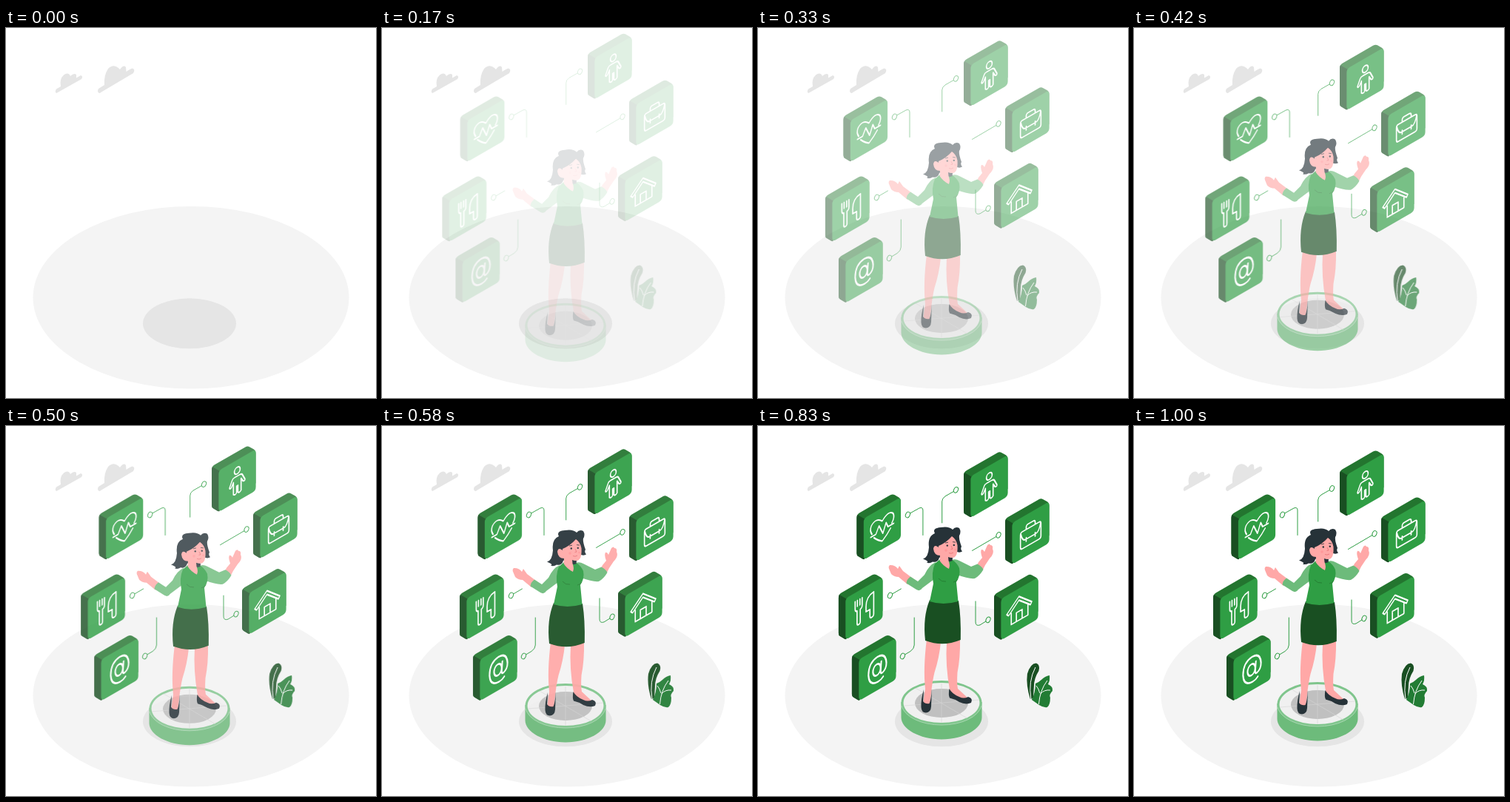
Animation of 500x500 px, one loop 1040 ms. Source, as an HTML page:

```html
<!DOCTYPE html>
<html lang="en">
<head>
<meta charset="utf-8">
<title>Services around a woman</title>
<style>
html, body { margin: 0; width: 100%; height: 100%; overflow: hidden; background: #fff; }
svg { display: block; width: 100vw; height: 100vh; }
.icon, .wire { fill: none; stroke-linecap: round; stroke-linejoin: round; }
.icon { stroke: #fff; }
.wire { stroke: #2f9e44; stroke-width: 1; }
.skin { fill: #ffa8a7; }
.dark { fill: #263238; }
.green { fill: #2f9e44; }
.soft { fill: #6dbb7b; }
.deep { fill: #194f22; }
</style>
</head>
<body>
<svg viewBox="0 0 500 500">
  <ellipse cx="250" cy="364.2" rx="213.5" ry="123.3" fill="#f4f4f4"/>
  <ellipse cx="248" cy="399.3" rx="63" ry="34" fill="#e5e5e5"/>
  <g fill="#e5e5e5">
    <path d="M126 88Q122.500 86 125 82L133 77Q132 64 138 55Q145 48 152 54L154 56Q159 49 162 53L162.500 59Q168 55 171 54.500Q175 56 172 61L129 86.500Q127 88 126 88Z"/>
    <path d="M68 88Q65.500 86 68 82.500L74 79Q72 69 78 63.500Q84 59 87 65Q92 60 95 63L95 67.500L101 64Q104.500 65 102 69L70 87Z"/>
  </g>

  <g id="left">
    <path class="deep" d="M366 369Q360 350 362 335Q366 321 374 320.500Q380 323 377.500 331Q371 341 371 352L370 368Z"/>
    <path fill="#227c34" d="M368 370Q373 360 373 348Q378 346 381 343Q386 338 392 337Q393 344 390 349Q397 352 396 358Q391 363 393 367Q393 377 389 380Q384 381 378 377Z"/>
    <path fill="none" stroke="#fff" d="M367 369Q363 345 373 326M377.500 376Q379 357 389 344M379.500 362Q385 356 393 357M379 361Q377 354 374 351"/>
  </g>
  <g id="right"></g>

  <g id="stand">
    <path class="soft" d="M193.500 375V396C193.500 411 218 425.500 248 425.500S302.500 411 302.500 396V375Z"/>
    <ellipse cx="248" cy="376" rx="54.500" ry="30" fill="#7fc58c"/>
    <path d="M194 380A54.500 30 0 0 0 302 380" fill="none" stroke="#a6d7af"/>
    <ellipse cx="248" cy="376" rx="51.500" ry="27" fill="#f0f0f0"/>
    <ellipse cx="248" cy="376.500" rx="36" ry="19.500" fill="#c0c0c0"/>
    <path d="M248 349.500V403M197 380L299 372M213 356L283 397" stroke="#d6d6d6" stroke-width=".6"/>
  </g>

  <g id="woman">
    <g class="skin">
      <path d="M228 290L247 294Q245 315 238.500 335Q236 345 234 362L232 379H223L226 357Q223 330 228 290Z"/>
      <path d="M255 294L273 290Q273.500 315 269.500 335Q268.500 350 270 357L283 369L276 376L259 368V358Q253 325 255 294Z"/>
      <path d="M209 208L204 204L196 198L191 191L189 195Q185 189.500 178 190Q175.500 192 177.500 196L180 202Q184 206 190 206L202 216Z"/>
      <path d="M295 192L298 186L303 180Q300 172 302 169Q304 168 306 172L310 163Q313 160 314 163Q318 163 317 168Q320 174 313 181L307 190L303 198Z"/>
    </g>
    <g class="dark">
      <path d="M224 358Q220 372 220.500 382Q221 389.500 227 389.500Q233.500 389 234 381L235 357Q234 372 231.500 377Q226 378 223 374Z"/>
      <path d="M258.500 357Q257 366 259 369.500Q266 371 272 375Q281 379 288 376Q291 370 284 368Q278 371 272 368Q262 364 258.500 357Z"/>
    </g>
    <path class="deep" d="M232 237Q250 241 271 238Q274.500 260 273.800 291Q250 301 226 292Q222.500 260 232 237Z"/>
    <path class="soft" d="M240 186Q231 190 225 203L216 212L206 205.500Q201 209 200.500 214.500L214 223Q219 226 222 221L238 209Z"/>
    <path class="soft" d="M262 183Q267 181 272 184L288 192L296.500 188.500Q302 191 304.500 196Q300 204 293 208Q285 209 269 203Z"/>
    <path class="green" d="M239 188L246 182L262 182.500Q269 187 272 194Q274 204 268 213L270.500 239Q250 245 232 239L237 215Q234 200 239 188Z"/>
    <path d="M244 208Q248 213 254 212M264 213Q268 212 270 209" fill="none" stroke="#23762f" stroke-width=".8"/>
    <path class="dark" d="M231 166Q229 151 239 147Q235 140 247 139Q258 137 263 142Q267 137 272 140Q275 145 272 150Q271 154 275 165Q273 168 276 171.500Q272 174 267 171L245 180Q243 187 236 185.500Q232 188 228 186.500Q232 185 223 181.500Q230 180 231 166Z"/>
    <path class="dark" d="M255 178L263 180L262.500 184Q259 186 256 184Z"/>
    <path class="skin" d="M244 164Q254 160 262 151Q268 155 269.500 163Q270.500 180 262.500 180Q259 180 257 179L257.500 184Q260 190 258 195Q250 191 245.500 184L246 177Q238 177 237 168Q238 161 244 166Z"/>
    <g fill="#ff989a"><circle cx="254" cy="170" r="1.800"/><circle cx="266.500" cy="169" r="1.400"/></g>
    <g class="dark"><circle cx="255.800" cy="163.500" r="1.200"/><circle cx="264.800" cy="162.800" r="1.200"/></g>
    <path d="M253 160L257 159M263 158.500L267 159" stroke="#263238" stroke-width=".8"/>
    <path d="M261 164L263 168L260.500 168.500M258 173.500Q261 175 264 173" fill="none" stroke="#e2686c" stroke-width=".7"/>
  </g>
</svg>
<script>
const $ = id => document.getElementById(id);

// Icons are flat shapes around 0,0, tilted into the front face of their tile.
const heart = 'M-16 0Q-20 -7 -17 -12Q-10 -20 0 -10Q10 -20 17 -12Q20 -6 15 0M-13 6Q-8 12 0 17Q8 12 13 6M-18 3H-10L-5 -6L1 7L6 -5L9 2H18';
const cutlery = 'M-14 -16V-6Q-14 -2 -11 -2V15a2.500 2.500 0 0 0 5 0V-2Q-3 -2 -3 -6V-16M-10.500 -16V-8M-6.500 -16V-8M15 -15Q3 -14 3 -1V6H9V15a3 3 0 0 0 6 0Z';
const at = 'M6 -8L5 5Q5 9 8 8Q14 6 14 -2Q13 -17 0 -17Q-14 -16 -14 1Q-13 17 1 17Q6 17 9 14M5 0A6 7.500 0 1 1 -7 0A6 7.500 0 1 1 5 0';
const person = 'M4.500 -13.500A4.500 4.500 0 1 1 -4.500 -13.500A4.500 4.500 0 1 1 4.500 -13.500M-4 -6H4Q7 -6 8 -4L12 4Q12 7 9 5L6 0V16Q3 19 1 16V7H-1V16Q-3 19 -6 16V0L-9 5Q-12 7 -12 4L-8 -4Q-7 -6 -4 -6';
const briefcase = 'M-13 -8H13Q16 -8 16 -5V12Q16 15 13 15H-13Q-16 15 -16 12V-5Q-16 -8 -13 -8M-7 -8V-11Q-7 -14 -4 -14H4Q7 -14 7 -11V-8M-15.500 -6Q-13 5 -8 5H8Q13 5 15.500 -6M-7 3V8M7 3V8';
const house = 'M-20 -2L-1 -17L19 0L17 3L-1 -12L-17 1ZM-13 0V15H13V1M-5 15V3H4V15';

function addTile(group, x, y, icon, width = 1.9) {
  $(group).insertAdjacentHTML('beforeend', `<g transform="translate(${x} ${y})">
    <path fill="#23752f" d="M0 32Q0 27.500 4 25.200L45 1.500Q48.500 -.4 51 1L56.500 4.200Q59.500 6 59.500 10V50L11 87Q9 89 7 87L2 84Q0 83 0 80Z"/>
    <path class="deep" d="M0 32Q0 29.500 1 28L10.500 33.500V88Q9 88.500 7 87L2 84Q0 83 0 80Z"/>
    <g transform="matrix(.866 -.5 0 1 34.500 46.500)">
      <rect class="green" x="-29" y="-28" width="58" height="56" rx="5"/>
      <path class="icon" stroke-width="${width}" d="${icon}"/>
    </g></g>`);
}

function addWire(group, x, y, path) {
  $(group).insertAdjacentHTML('beforeend', `<g class="wire">
    <ellipse rx="2.800" ry="4" transform="translate(${x} ${y}) rotate(25)"/><path d="${path}"/></g>`);
}

addTile('left', 131.5, 92, heart);
addTile('left', 107, 200, cutlery);
addTile('left', 125, 282.5, at, 2.4);
addTile('right', 278, 33, person);
addTile('right', 334, 96, briefcase);
addTile('right', 319, 198.5, house);
addWire('left', 200.5, 120, 'M203.500 118L216 111Q221 109 221 114V147.500');
addWire('left', 176.5, 229, 'M179.500 227L191.500 220');
addWire('left', 193.5, 311, 'M196.500 309L204 304.500Q209.300 301 209.300 296V259');
addWire('right', 267.5, 84.5, 'M264.500 86.500L253 93Q248.700 96 248.700 100V129');
addWire('right', 325, 145.5, 'M322 147.500L289.500 166.500');
addWire('right', 311, 260, 'M308 262L300 267Q294 269 294 263V235');

const bezier = (a, b, t) => 3 * (1 - t) ** 2 * t * a + 3 * (1 - t) * t * t * b + t ** 3;

// cubic-bezier(.36, -.01, .5, 1.38)
function ease(x) {
  let lo = 0, hi = 1;
  for (let i = 0; i < 24; i++) {
    const mid = (lo + hi) / 2;
    if (bezier(.36, .5, mid) < x) lo = mid; else hi = mid;
  }
  return bezier(-.01, 1.38, hi);
}

const LOOP = 1040, FPS = 24, SLIDE = 30, LEAD = .033;
const moves = { left: [-1, 0], right: [0, -1], stand: [0, 1], woman: [0, 1] };

function draw(now) {
  const step = Math.floor((now % LOOP + 4) * FPS / 1000);
  const progress = step < 2 ? 0 : ease(Math.min(1, step / FPS + LEAD));
  const gap = SLIDE * (1 - progress);
  for (const id in moves) {
    const [dx, dy] = moves[id];
    $(id).setAttribute('transform', `translate(${dx * gap} ${dy * gap})`);
    $(id).setAttribute('opacity', Math.min(1, progress));
  }
}

let start;
function tick(now) {
  start ??= now;
  draw(now - start);
  requestAnimationFrame(tick);
}
draw(0);
requestAnimationFrame(tick);
</script>
</body>
</html>
```
